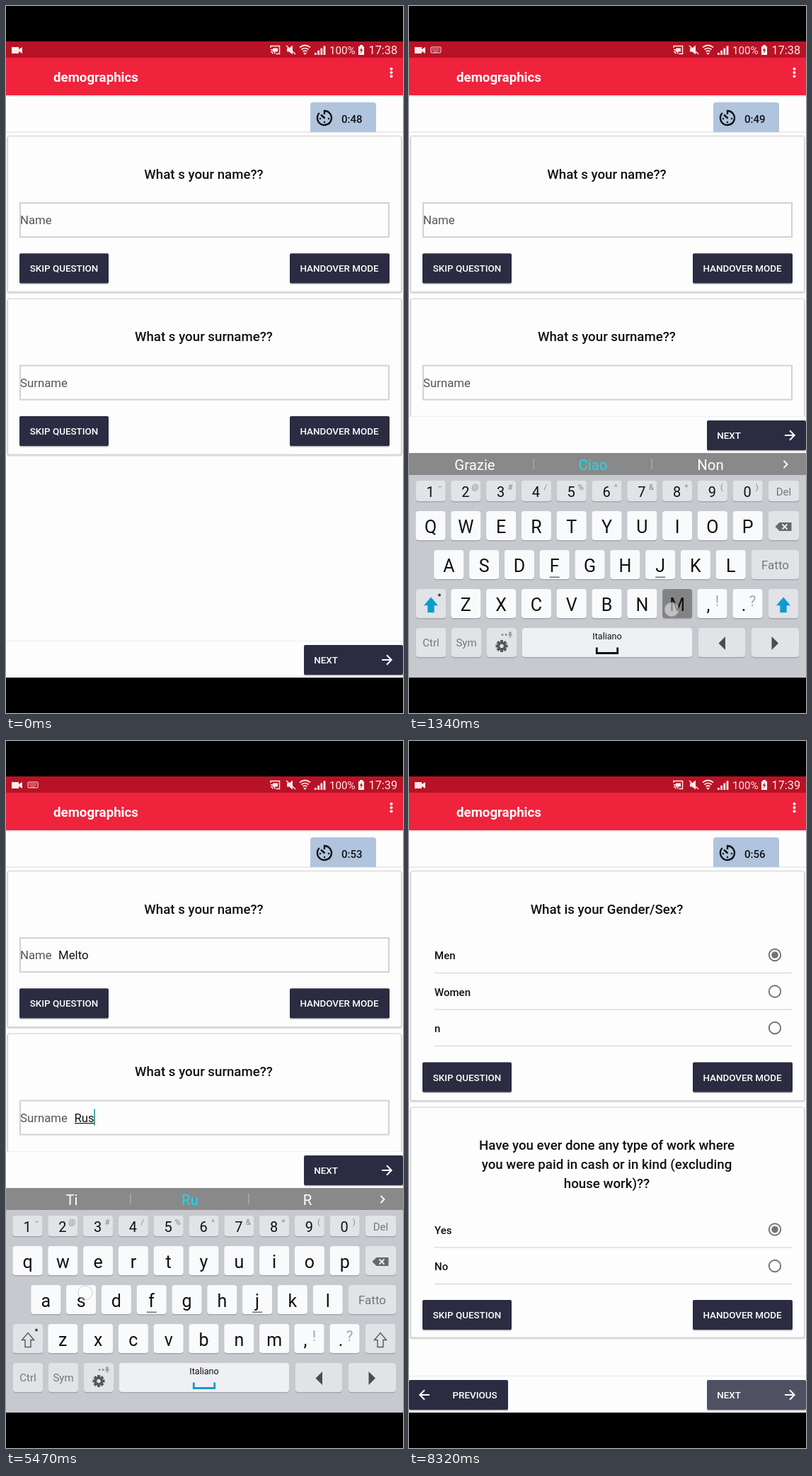
An HTML page that plays this animation: 561x998 px, repeating every 8.35 s.

```html
<!DOCTYPE html>
<html lang="en">
<head>
<meta charset="utf-8">
<title>Form typing</title>
<style>
  html, body { margin: 0; width: 100%; height: 100%; overflow: hidden; background: #000; }
  svg { display: block; width: 100vw; height: 100vh; font-family: Roboto, sans-serif; }
</style>
</head>
<body>
<svg id="stage" viewBox="0 0 561 998"></svg>
<script>
const LOOP = 8350;
const RESIZE = 440, KB_IN = 540, KB_OUT = 6950, NEXT_DOWN = 7530, PAGE = 7930;
const NAVY = '#2b2c41', INK = '#111';

// ---- markup helpers
const rect = (x, y, w, h, fill, more = '') =>
  `<rect x="${x}" y="${y}" width="${w}" height="${h}" fill="${fill}" ${more}/>`;
const text = (x, y, size, str, fill = INK, more = '') =>
  `<text x="${x}" y="${y}" font-size="${size}" fill="${fill}" ${more}>${str}</text>`;
const mid = (x, y, size, str, fill, more = '') =>
  text(x, y, size, str, fill, `text-anchor="middle" ${more}`);
const line = (d, color, w = 2, more = '') =>
  `<path d="${d}" fill="none" stroke="${color}" stroke-width="${w}" ${more}/>`;
const shape = (d, fill, more = '') => `<path d="${d}" fill="${fill}" ${more}/>`;
const group = (id, body, more = '') => `<g id="${id}" ${more}>${body}</g>`;
const BOLD = 'font-weight="500"';

// ---- form pieces
const button = (x, y, w, label, tx, id = '') =>
  rect(x, y + 1.5, w, 42, '#000', 'rx="2" opacity=".28"') +
  rect(x, y, w, 42, NAVY, `rx="2" ${id && `id="${id}"`}`) +
  mid(tx, y + 26, 13.4, label, '#fff', BOLD);
const arrow = (x, y, flip = 1) =>
  line('M-7 0H6.5M0 -6.7L6.7 0L0 6.7', '#fff', 2, `transform="translate(${x} ${y}) scale(${flip} 1)"`);
const card = (y, h) =>
  rect(1, y + 1, 559, h + 1, '#000', 'rx="3" opacity=".13"') +
  rect(2.5, y + .5, 556, h - 1, '#fdfdfd', 'rx="2" stroke="#cfcfcf"');
const actions = y => button(19, y, 126, 'SKIP QUESTION', 82) + button(401, y, 141, 'HANDOVER MODE', 471);
const question = (y, str) => mid(279.5, y, 18.7, str, INK, BOLD);

const field = (y, label, id, x) =>
  card(y, 221) +
  question(y + 60.5, `What s your ${label.toLowerCase()}??`) +
  rect(20, y + 95, 521, 48, 'none', 'stroke="#d2d2d2" stroke-width="2"') +
  text(20, y + 125, 16.8, label, '#555') +
  text(x, y + 125, 16.8, '', INK, `id="${id}"`) +
  rect(x, y + 126.5, 0, 1.2, INK, `id="${id}Line"`) +
  rect(x, y + 107, 1.6, 23, '#159b95', `id="${id}Caret"`) +
  actions(y + 166.3);

const option = (y, label, on) =>
  text(36, y + 6, 15, label, INK, BOLD) +
  rect(36, y + 25, 506, 1, '#d2d2d6') +
  `<circle cx="517" cy="${y}" r="8.2" fill="none" stroke="#747474" stroke-width="1.9"/>` +
  (on ? `<circle cx="517" cy="${y}" r="4.8" fill="#747474"/>` : '');

const first = () => field(183, 'Name', 'name', 74) + field(412.6, 'Surname', 'surname', 96.5);
const second = () =>
  card(183, 325) + question(243.5, 'What is your Gender/Sex?') +
  option(302, 'Men', true) + option(353.5, 'Women') + option(405, 'n') + actions(453.5) +
  card(516.5, 326) +
  ['Have you ever done any type of work where', 'you were paid in cash or in kind (excluding', 'house work)??']
    .map((s, i) => question(576.5 + 27 * i, s)).join('') +
  option(689.5, 'Yes', true) + option(741, 'No') + actions(789);

const footer = () =>
  rect(0, 896, 561, 52, '#fdfdfd') + rect(0, 896, 561, 1, '#ececf3') +
  group('prev', button(0, 902, 140, 'PREVIOUS', 93) + arrow(22, 923, -1)) +
  button(421, 902, 140, 'NEXT', 452, 'next') +
  '<circle id="ripple" cx="490" cy="923" r="0" fill="#fff" opacity=".1" clip-path="url(#nextClip)"/>' +
  text(435.2, 928, 13.4, '', '#fff') + arrow(538, 923);

// ---- top bars
const statusIcons = () => {
  const c = '#fbe9ea';
  return shape('M8 58h10v3l5-3v9l-5-3v3h-10z', c) +
    group('kbIcon', rect(31, 58, 14, 8, 'none', `stroke="${c}" stroke-width="1" rx="1"`) +
      line('M33 60.5h10M33 62.5h10M35 64.6h6', c, 1, 'stroke-dasharray="1.3 .8"')) +
    line('M374 59v-2.5h12.5v11h-5', c, 1.5) +
    line('M374 61.5a6 6 0 0 1 6 6M374 64.5a3 3 0 0 1 3 3', c, 1.4) + rect(377, 59.5, 7, 5, c) +
    shape('M397 59.5h3l5-4v13l-5-4h-3z', c) + line('M396 56l13 12', c, 1.6) +
    line('M415 58.5q7.5-6 15 0M417.4 61.5q5.1-4 10.2 0M419.6 64.3q2.9-2.2 5.8 0', c, 1.7) +
    shape('M420 66h5l-2.5 3z', c) +
    [0, 1, 2, 3].map(i => rect(436 + 4.2 * i, 66 - 3.2 * i, 2.8, 3 + 3.2 * i, c)).join('') +
    text(457, 67.6, 15.2, '100%', c) +
    shape('M498 57h2v-2h4v2h2v12h-8z', '#fff') + shape('M502.8 58l-3 5h2l-1 4.5 3.6-5.7h-2z', '#b71224') +
    text(512.5, 68, 16.3, '', c, 'id="clock"');
};

const header = () =>
  rect(0, 50, 561, 23, '#b81226') + statusIcons() +
  rect(0, 126, 561, 52, '#fdfdfd') + rect(0, 126, 561, 2, '#000', 'opacity=".1"') +
  rect(0, 73, 561, 53, '#ef233c') +
  text(67, 106.5, 18.7, 'demographics', '#fff', 'font-weight="700"') +
  [88.7, 94, 99.3].map(y => `<circle cx="544.5" cy="${y}" r="2" fill="#fff"/>`).join('') +
  rect(0, 177.5, 561, 1, '#dadade') +
  shape('M430 178v-38q0-4 4-4h85q4 0 4 4v38z', '#b0c4de') +
  line('M450 153v-5a10 10 0 1 1-7.2 3', INK, 2.4) + line('M445 153.5l5.5 5', INK, 2.6) +
  [[444, 159], [456, 159], [450, 164]].map(p => `<circle cx="${p[0]}" cy="${p[1]}" r="1.2"/>`).join('') +
  text(474, 165, 15, '', INK, `id="timer" ${BOLD}`);

// ---- keyboard
const PITCH = 49.8, GREY = '#e1e3e6', keyPos = {};
const key = (x, y, w, h, fill, id = '') =>
  rect(x, y + 1.5, w, h, '#94979e', 'rx="4" opacity=".65"') +
  rect(x, y, w, h, fill, `rx="4" ${id && `id="${id}"`}`);
const letters = (row, x0, y) => [...row].map((ch, i) => {
  const x = x0 + PITCH * i;
  keyPos[ch] = [x, y + 21];
  return key(x - 21, y, 42, 41, '#f9fafb', 'key-' + ch) +
    mid(x, y + 31, 25, ch, INK, `data-ch="${ch}"`) +
    ('fj'.includes(ch) ? rect(x - 7, y + 37.5, 14, 1.7, '#777') : '');
}).join('');
const shift = x => key(x - 21, 823, 42, 41, GREY) +
  shape('M0-10L8.5 0H4V10H-4V0H-8.5z', 'none', `class="shift" transform="translate(${x} 845.5)" stroke-width="1.4"`);
const label = (x, y, size, str) => mid(x, y, size, str, '#73767c');

const keyboard = () => {
  const marks = '−@#/%^&amp;*()'.match(/&amp;|./g);
  const digits = [...'1234567890'].map((d, i) => {
    const x = 30.5 + PITCH * i;
    return key(x - 21, 670, 42, 29, GREY) + mid(x - .5, 692.5, 20, d, INK) + mid(x + 13, 683, 11.5, marks[i], '#85878c');
  }).join('');
  const gear = [0, 45, 90, 135].map(a => rect(-2, -8.5, 4, 17, '#55575c', `transform="rotate(${a})"`)).join('');
  return rect(0, 631, 561, 372, '#c7c9ce') + rect(0, 631, 561, 31, '#898989') +
    group('seps', rect(175.5, 639, 1, 15, '#bbb') + rect(342.5, 639, 1, 15, '#bbb')) +
    [93, 260, 426].map((x, i) => mid(x, 655, 20.4, '', i === 1 ? '#14dcec' : '#fff', 'class="hint"')).join('') +
    text(18, 655, 20.4, '', '#14dcec', 'id="solo"') +
    line('M529.5 642l5 5-5 5', '#fff', 1.8) +
    digits + key(508, 670, 43, 29, GREY) + label(529.5, 690.5, 15, 'Del') +
    letters('qwertyuiop', 30.5, 713) + key(508, 713, 43, 41, GREY) +
    shape('M517.5 735l6-6h17v12h-17z', '#66686d') + line('M527.5 731.5l7 7m0-7l-7 7', '#eee', 1.8) +
    letters('asdfghjkl', 56.3, 768) + key(484, 768, 67, 41, GREY) + label(517.5, 795, 17, 'Fatto') +
    shift(31) + '<circle cx="43" cy="831.5" r="2" fill="#444"/>' +
    letters('zxcvbnm', 80.3, 823) +
    [[428.5, ',', '!'], [478.5, '.', '?']].map(([x, a, b]) =>
      key(x - 21, 823, 42, 41, '#f9fafb') + mid(x - 5.5, 854, 25, a, INK) + mid(x + 7, 847, 21, b, '#a4a6ab')).join('') +
    shift(529) +
    [[10, 42], [60, 42], [110, 42], [409, 66], [484, 67]].map(k => key(k[0], 878, k[1], 41, GREY)).join('') +
    label(31, 904, 15, 'Ctrl') + label(81, 904, 15, 'Sym') +
    group('gear', gear + '<circle r="6.2" fill="#55575c"/><circle r="2.7" fill="#e1e3e6"/>', 'transform="translate(131 903.5)"') +
    [132, 137].map(x => `<circle cx="${x}" cy="887.5" r="1.3" fill="#777"/>`).join('') +
    rect(141.3, 883, 3.4, 6, '#999', 'rx="1.7"') + line('M139.8 887q3.2 6 6.4 0M143 890v2', '#999', 1) +
    key(160, 878, 240, 41, '#eff0f3') + mid(280, 894, 12.6, 'Italiano', INK) +
    line('M265.3 905.5v8h29.4v-8', INK, 2.8, 'id="bracket"') +
    shape('M447 890v19l-9.5-9.5zM512.5 890v19l9.5-9.5z', '#4b4d52');
};

const stage = document.getElementById('stage');
stage.innerHTML =
  `<clipPath id="nextClip">${rect(421, 902, 140, 42, '#000', 'rx="2"')}</clipPath>` +
  rect(0, 0, 561, 998, '#fdfdfd') +
  group('page1', first()) + group('page2', second()) +
  rect(0, 631, 561, 317, '#ebebeb', 'id="blank"') +
  group('footer', footer()) + header() + group('keyboard', keyboard()) +
  '<circle id="touch" r="10" fill="#fff" fill-opacity=".5" stroke="#999" stroke-opacity=".6"/>' +
  rect(0, 0, 561, 50, '#000') + rect(0, 948, 561, 50, '#000');

// ---- timeline
const typing = {
  name: [['M', 1080, 1420, -8, 8], ['e', 1610, 1700, 4, 3], ['l', 1910, 2000, -5, 4], ['t', 2230, 2320, 3, 5], ['o', 2570, 2660, -10, 2]],
  surname: [['R', 4400, 4620, 4, 5], ['u', 4860, 4950, -6, 4], ['s', 5340, 5430, 6, -10], ['t', 5760, 5850, 5, 2], ['o', 6120, 6210, -8, 2]]
};
const strokes = [...typing.name, ...typing.surname];
const taps = [
  [300, 303, 30, 140], [320, 535, 3510, 3640], [490, 923, NEXT_DOWN, 7650],
  ...strokes.map(([ch, down, up, dx, dy]) => {
    const [x, y] = keyPos[ch.toLowerCase()];
    return [x + dx, y + dy, down, up];
  })
];
const hints = [
  [0, 'Grazie', 'Ciao', 'Non'], [1460, 'Ma', 'M', 'Mi'], [1760, 'Ma', 'Me', 'Mi'], [2060, 'Mela', 'Mel', 'Mele'],
  [2400, 'Melt'], [2750, 'Melto'], [3800, 'Grazie', 'Ciao', 'Non'], [4680, 'Ti', 'R', 'E'],
  [5030, 'Ti', 'Ru', 'R'], [5520, 'Ruspa', 'Rus', 'Rust'], [5930, 'Busto', 'Rust', 'Rusto'], [6330, 'Busto', 'Rusto', 'Rusta']
];
const SURNAME_FOCUS = 3700;
const caretResets = [670, ...strokes.map(s => s[2]), SURNAME_FOCUS, 7030].sort((a, b) => a - b);

const $ = id => document.getElementById(id);
const all = sel => [...stage.querySelectorAll(sel)];
const set = (el, attrs) => { for (const k in attrs) el.setAttribute(k, attrs[k]); };
const show = (el, on) => set(el, { visibility: on ? 'inherit' : 'hidden' });
const write = (el, str) => { if (el.textContent !== str) el.textContent = str; };
const clamp = v => Math.max(0, Math.min(1, v));
const letterEls = all('[data-ch]'), shiftEls = all('.shift'), hintEls = all('.hint');

function drawField(id, t, focused, composing) {
  const el = $(id), x = +el.getAttribute('x');
  write(el, typing[id].filter(s => s[2] <= t).map(s => s[0]).join(''));
  const w = el.textContent ? el.getComputedTextLength() : 0;
  const reset = caretResets.filter(r => r <= t).pop();
  set($(id + 'Line'), { x: x + .5, width: composing ? w : 0 });
  set($(id + 'Caret'), { x: x + w - .5 });
  show($(id + 'Caret'), focused && reset !== undefined && (t - reset) % 1000 < 500);
}

function drawKeyboard(t) {
  const open = clamp((t - KB_IN) / 340), close = clamp((t - KB_OUT) / 300);
  const off = Math.max(1 - open, close);
  set($('keyboard'), { transform: `translate(0 ${54 * off * off})`, opacity: 1 - off });
  show($('keyboard'), off < 1);

  const caps = t < 1450 || (t >= 3800 && t < 4630);
  letterEls.forEach(el => write(el, caps ? el.dataset.ch.toUpperCase() : el.dataset.ch));
  shiftEls.forEach(el => set(el, caps ? { fill: '#0d9bd3', stroke: '#0d9bd3' } : { fill: 'none', stroke: '#55575c' }));
  set($('bracket'), { stroke: caps ? INK : '#159bd0' });

  const words = hints.filter(h => h[0] <= t).pop().slice(1), single = words.length === 1;
  hintEls.forEach((el, i) => write(el, single ? '' : words[i]));
  write($('solo'), single ? words[0] : '');
  show($('seps'), !single);

  for (const ch in keyPos) {
    const held = strokes.some(s => s[0].toLowerCase() === ch && t >= s[1] && t < s[2]);
    set($('key-' + ch), { fill: held ? '#828385' : '#f9fafb' });
  }
}

function draw(t) {
  const small = t >= RESIZE && t < KB_OUT, later = t >= PAGE;
  show($('page1'), !later);
  show($('page2'), later);
  show($('prev'), later);
  show($('blank'), small);
  show($('kbIcon'), small);
  set($('footer'), { transform: `translate(0 ${small ? -317 : 0})` });
  write($('clock'), t < 1890 ? '17:38' : '17:39');
  write($('timer'), '0:' + (48 + Math.floor((t + 110) / 1000)));

  drawField('name', t, !later && t < SURNAME_FOCUS, t < SURNAME_FOCUS);
  drawField('surname', t, !later && t >= SURNAME_FOCUS, t < KB_OUT);
  drawKeyboard(t);

  const press = clamp((t - NEXT_DOWN) / 350);
  set($('next'), { fill: press > 0 ? '#444659' : NAVY });
  set($('ripple'), { r: 80 * press, opacity: .06 });

  const tap = taps.find(p => t >= p[2] && t < p[3] + 180);
  show($('touch'), !!tap);
  if (tap) set($('touch'), { cx: tap[0], cy: tap[1], opacity: 1 - clamp((t - tap[3]) / 180) });
}

const start = performance.now();
function tick() {
  draw((performance.now() - start) % LOOP);
  requestAnimationFrame(tick);
}
tick();
</script>
</body>
</html>
```
